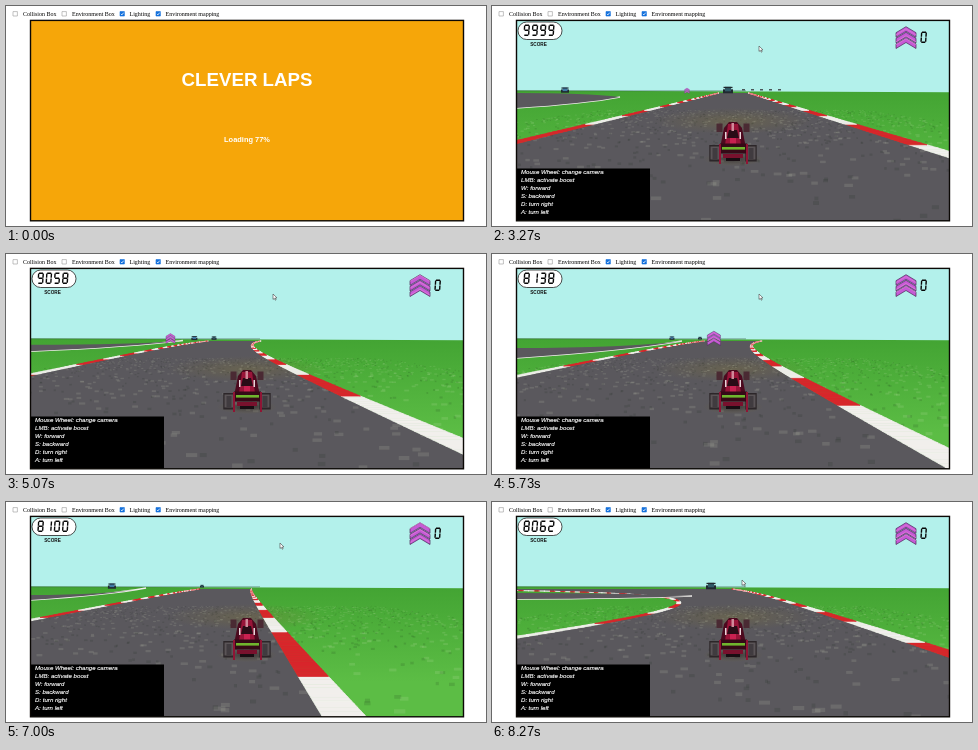
Write an HTML page with a canvas that moves like this. It is 480 px wide and 220 px high and loops after 8340 ms.

```html
<!DOCTYPE html>
<html lang="en">
<head>
<meta charset="utf-8">
<title>Racing game</title>
<style>
html, body { margin: 0; width: 100%; height: 100%; overflow: hidden; background: #fff; }
canvas, svg { position: absolute; left: 0; top: 0; width: 480px; height: 220px; }
.serif { font: 6px "Liberation Serif", serif; }
.sans { font: bold 7.45px "Liberation Sans", sans-serif; fill: #fff; text-anchor: middle; }
.help { font: italic 6.1px "Liberation Sans", sans-serif; fill: #fff; stroke: #fff; stroke-width: .15; }
</style>
</head>
<body>
<canvas id="view" width="480" height="220"></canvas>
<svg viewBox="0 0 480 220">
  <g class="serif">
    <text x="17" y="10">Collision Box</text>
    <text x="66" y="10">Environment Box</text>
    <text x="123.5" y="10">Lighting</text>
    <text x="159.5" y="10">Environment mapping</text>
  </g>
  <g stroke-width=".6">
    <path d="M7 5.6h4.4v4.4h-4.4zM56 5.6h4.4v4.4h-4.4z" fill="#fff" stroke="#999"/>
    <path d="M114 5.6h4.4v4.4h-4.4zM150 5.6h4.4v4.4h-4.4z" fill="#1471dc" stroke="#1471dc"/>
    <path d="M114.9 7.9l1 1 1.7-2.2M150.9 7.9l1 1 1.7-2.2" fill="none" stroke="#fff" stroke-width=".8"/>
  </g>
  <g id="load" class="sans">
    <rect x="24" y="14" width="434" height="201" fill="#f6a609"/>
    <text x="241" y="80" style="font-size:18.7px">CLEVER LAPS</text>
    <text id="percent" x="241" y="136.3"></text>
  </g>
  <g id="hud">
    <rect x="25" y="162.5" width="133" height="52"/>
    <g class="help">
      <text x="29" y="168.2">Mouse Wheel: change camera</text>
      <text x="29" y="176.2">LMB: activate boost</text>
      <text x="29" y="184.2">W: forward</text>
      <text x="29" y="192.2">S: backward</text>
      <text x="29" y="200.2">D: turn right</text>
      <text x="29" y="208.2">A: turn left</text>
    </g>
    <text x="46.5" y="39.8" class="sans" style="font-size:4.7px;fill:#111">SCORE</text>
  </g>
  <rect x="24.5" y="14.4" width="433" height="200.4" fill="none" stroke="#0b0805" stroke-width="1.4"/>
</svg>
<script>
const LOOP = 8340, RACE = 1500, CHASE = 3235, DRIVE = 3709, HORIZON = 85, FOCAL = 240;
const ROAD = '#5a585d', RED = '#d8262b', WHITE = '#f1efec';
const el = id => document.getElementById(id);
const g = el('view').getContext('2d');

// Road edges follow x = c + a*d + b/(d+3), with d the distance below the horizon.
// far: top, bottom and tip (depth, x) of the distant road; rivals: x and size of two cars.
const poses = [
  { at: DRIVE, right: [250, 3.1, 0], left: [235, -4, 0], far: [2, 17, 6, 128], rivals: [73, 8, 236, 10], boost: 195 },
  { at: 4470, right: [196, 2.46, 200], left: [176, -4.4, 130], far: [3, 6, 1, 165], rivals: [196, 7, 208, 6], boost: 112 },
  { at: 5730, right: [226, 1.76, 200], left: [202, -4.7, 100], far: [9, 19, 2, 190], rivals: [180, 5, 208, 4], boost: 222 },
  { at: 7000, right: [238, .6, 30], left: [192, -5, 60], far: [8, 13, 1, 140], rivals: [106, 8, 196, 4], boost: 60 },
  { at: 8270, right: [258, 2.85, -120], left: [434, -7.1, -2500], far: [6, 12, 9, 200], rivals: [0, 10, 219, 10], boost: 0 }];

const clamp = v => Math.min(1, Math.max(0, v));
const blend = (a, b, k) => Array.isArray(a) ? a.map((v, i) => blend(v, b[i], k)) : a + (b - a) * k;

function poseAt(t) {
  const i = Math.max(0, poses.slice(0, -1).findLastIndex(p => p.at <= t));
  const [a, b] = poses.slice(i, i + 2);
  let k = clamp((t - a.at) / (b.at - a.at));
  if (i === 0) k *= k;
  return Object.fromEntries(Object.keys(a).map(key => [key, blend(a[key], b[key], k)]));
}

// Points of a road edge from the bottom of the view up to the horizon
const edge = ([c, a, b]) => Array.from({ length: 141 }, (_, i) => {
  const d = 132 * Math.pow(2 / 132, i / 140);
  return [c + a * d + b / (d + 3), HORIZON + d];
});

function trace(points) {
  g.beginPath();
  points.forEach(p => g.lineTo(p[0], p[1]));
}
function poly(color, points) {
  trace(points);
  g.closePath();
  g.fillStyle = color;
  g.fill();
}
function box(color, x, y, w, h) {
  g.fillStyle = color;
  g.fillRect(x, y, w, h);
}
function line(color, width) {
  g.strokeStyle = color;
  g.lineWidth = width;
  g.stroke();
}
function glow(x, y, rx, ry, color) {
  g.save();
  g.translate(x, y);
  g.scale(rx, ry);
  const fade = g.createRadialGradient(0, 0, 0, 0, 0, 1);
  fade.addColorStop(0, color);
  fade.addColorStop(1, 'rgba(120,110,60,0)');
  box(fade, -1, -1, 2, 2);
  g.restore();
}

let seed = 7;
const rnd = () => (seed = seed * 16807 % 2147483647) / 2147483647;
const grains = Array.from({ length: 1600 }, () => [rnd(), rnd(), rnd()]);
const grain = c => c < .5 ? 'rgba(20,35,20,.13)' : 'rgba(225,235,200,.12)';

// Kerb whose stripes keep their length on the ground
function kerb(points, width, travel) {
  const ground = ([x, y]) => [(x - 240) / (y - HORIZON), FOCAL / (y - HORIZON)];
  let s = travel + ground(points[0])[1];
  for (let i = 1; i < points.length; i++) {
    const a = points[i - 1], b = points[i], p = ground(a), q = ground(b);
    const color = Math.floor(s / 2.6) % 2 ? RED : WHITE;
    s += Math.hypot(p[0] - q[0], p[1] - q[1]);
    poly(color, [a, b, [b[0] + width * (b[1] - HORIZON), b[1]], [a[0] + width * (a[1] - HORIZON), a[1]]]);
    line(color, .7);
  }
}

function chevrons(x, y, size, t) {
  const h = size / 2;
  const bend = top => [[x - h, top + size * .3], [x, top], [x + h, top + size * .3]];
  for (let i = 0; i < 3; i++) {
    const top = y + i * size * .28;
    poly('#c65ad6', [...bend(top), ...bend(top + size * .23).reverse()]);
    line('#4b2857', size / 28);
    trace(bend(top + (t / 500 + i / 3) % 1 * size * .2));
    line('#e27fd6', size / 28);
  }
}

// Seven-segment digits, one bit per bar
const SEGMENTS = [0x77, 0x24, 0x5d, 0x6d, 0x2e, 0x6b, 0x7b, 0x27, 0x7f, 0x6f];
const BARS = ['M.3 0h4', 'M0 .4v4.2', 'M4.6 .4v4.2', 'M.3 5h4', 'M0 5.4v4.2', 'M4.6 5.4v4.2', 'M.3 10h4'];
function digit(n, x, y) {
  g.save();
  g.transform(1, 0, -.07, 1, x + .7, y);
  g.strokeStyle = '#080808';
  g.lineWidth = 1.4;
  BARS.forEach((bar, i) => SEGMENTS[n] >> i & 1 && g.stroke(new Path2D(bar)));
  g.restore();
}

const score = t => 9999 - Math.floor(Math.max(0, t - DRIVE) * .0302)
  - (t > 4100 ? 900 : 0) - (t > 5100 ? 900 : 0);

function hud(t) {
  g.beginPath();
  g.roundRect(26, 16, 44, 17.5, 8.7);
  g.fillStyle = '#fff';
  g.fill();
  line('#222', .8);
  [...String(score(t))].forEach((n, i) => digit(+n, 32 + i * 8.2, 19.2));
  chevrons(414, 20.7, 20, t);
  digit(0, 429, 26.2);
}

function rival(x, size, color) {
  const y = HORIZON - .7;
  box('#20292f', x - size / 2, y - size * .1, size, size * .4);
  box(color, x - size * .3, y - size * .35, size * .6, size * .45);
  box('#20292f', x - size * .45, y - size * .35, size * .9, size * .13);
}

function racer() {
  glow(241, 153, 30, 7, 'rgba(15,12,18,.6)');
  for (const s of [-1, 1]) {
    const x = 241 + s * 18;
    box('#4a2a33', 241 + s * 13.5 - 3, 117.5, 6, 8.5);
    box('#2c2629', x - 5.7, 139, 11.4, 16.5);
    box('#5a5457', x - 4.5, 140.5, 9, 13);
    box('#403b3f', x - 2.5, 142, 5, 11);
  }
  poly('#4c0a1f', [[232, 122], [237, 116], [245, 116], [250, 122], [254, 142], [228, 142]]);
  poly('#981438', [[236, 118], [246, 118], [249, 139], [233, 139]]);
  poly('#2a0c16', [[237, 124], [245, 124], [247, 132], [235, 132]]);
  box('#d08a9a', 239.5, 117, 2.5, 8);
  box('#e8d6da', 233, 126, 1.5, 7);
  box('#e8d6da', 247.5, 126, 1.5, 7);
  box('#c82150', 238, 132, 6, 6);
  box('#350a17', 228, 137.5, 27, 10);
  box('#6fb52e', 230, 141, 23, 2.6);
  box('#8f1535', 227, 138, 2, 20);
  box('#8f1535', 254, 138, 2, 20);
  box('#78112d', 231, 148, 20, 4);
  box('#180e13', 234, 152, 14, 3);
}

function cursor(t) {
  const a = clamp((t - 5730) / 1270), b = clamp((t - 7000) / 1270);
  g.save();
  g.translate(267 + 7 * a - 24 * b, 40 + a + 37 * b);
  poly('#fff', [[0, 0], [0, 5.4], [1.3, 4.3], [2.3, 6.2], [3.1, 5.8], [2.3, 4], [4, 3.9]]);
  line('#444', .6);
  g.restore();
}

function farRoad([top, bottom, tip, x]) {
  const mid = (24 + 2 * x) / 3, y = HORIZON;
  g.beginPath();
  g.moveTo(24, y + bottom);
  g.quadraticCurveTo(mid, y + (bottom + tip) / 2 + 1, x, y + tip);
  line(WHITE, 1.4);
  g.quadraticCurveTo(mid, y + top, 24, y + top);
  g.fillStyle = ROAD;
  g.fill();
}

function chaseView(t) {
  const u = Math.max(0, t - DRIVE) / 1000, speed = 8.9;
  const travel = speed * (u < 1.5 ? u * u / 3 : u - .75) + 3.35;
  const pose = poseAt(t), r = edge(pose.right), l = edge(pose.left);
  const grass = g.createLinearGradient(0, HORIZON, 0, 180);
  grass.addColorStop(0, '#43a433');
  grass.addColorStop(1, '#5cbd45');
  box('#b3f1eb', 24, 14, 434, 75);
  poly(grass, [[24, 84.5], [458, 86.3], [458, 216], [24, 216]]);
  box('rgba(45,75,55,.5)', 24, 84.4, 230, .8);
  poly(ROAD, [...l, ...[...r].reverse(), [458, 217], [24, 217]]);
  glow(241, 115, 80, 13, 'rgba(126,116,62,.4)');
  for (const [a, b, c] of grains) {
    const z = 1.8 + (((b * 11 - travel) % 11) + 11) % 11, d = FOCAL / z;
    box(grain(c), 240 + (a - .5) * 14 * d, HORIZON + d, d * (.03 + c * .07), d * .035);
  }
  kerb(l, -.25, travel);
  farRoad(pose.far);
  kerb(r, .34, travel);

  if (t < 5000) for (let i = 0; i < 5; i++) box('#4a5658', 250 + i * 9 - u * 35, 83, 3, 1.5);
  const [ax, as, bx, bs] = pose.rivals;
  rival(ax, as, '#3f79a5');
  rival(bx, bs, '#315a68');
  if (t < 6500) {
    const size = 19110 / (7200 - t);
    chevrons(pose.boost, HORIZON - size * .6, size, t);
  }
  racer();
  cursor(t);
}

// Smooth curve through a few points
function curve(...pts) {
  const at = i => pts[Math.min(pts.length - 1, Math.max(0, i))], out = [];
  for (let k = 0; k <= (pts.length - 1) * 20; k++) {
    const i = Math.floor(k / 20), u = k / 20 - i;
    out.push([0, 1].map(c => {
      const [a, b, d, e] = [-1, 0, 1, 2].map(j => at(i + j)[c]);
      return b + u / 2 * (d - a + u * (2 * a - 5 * b + 4 * d - e + u * (3 * (b - d) + e - a)));
    }));
  }
  return out;
}

function border(points) {
  trace(points);
  line(WHITE, 4.8);
  g.setLineDash([8, 8]);
  line(RED, 4.8);
  g.setLineDash([]);
}

function smallCar(x, y, angle, color, size) {
  g.save();
  g.translate(x, y);
  g.rotate(angle);
  g.scale(size, size);
  for (const s of [-1, 1]) {
    box('#18181c', s * 3.5 - 1.2, -6, 2.4, 4);
    box('#18181c', s * 3.7 - 1.5, 4, 3, 5);
  }
  poly(color, [[-1, -9], [1, -9], [3, 2], [2, 8], [-2, 8], [-3, 2]]);
  box(color, -3.5, -9, 7, 1.6);
  box('#25131c', -1, -1, 2, 3);
  box(color, -3.5, 7.5, 7, 2);
  g.restore();
}

const track = [
  curve([210, 12], [198, 77], [188, 137], [183, 217]),
  curve([269, 12], [285, 102], [312, 177], [339, 202], [380, 211], [460, 206])];
const bendOuter = curve([121, 12], [125, 38], [111, 76], [79, 115], [22, 158]);
const bendInner = curve([22, 79], [37, 64], [42, 47], [22, 30]);

function topView(t) {
  const grass = '#60b44b';
  box(grass, 24, 14, 434, 202);
  poly(ROAD, [...track[0], [458, 217], ...[...track[1]].reverse()]);
  poly(ROAD, [[22, 12], ...bendOuter]);
  poly(grass, bendInner);
  glow(168, 103, 7, 9, 'rgba(205,230,150,.55)');
  glow(180, 75, 5, 8, 'rgba(205,230,150,.4)');
  for (const [x, y, c] of grains) box(grain(c), 24 + x * 434, 14 + y * 202, 1.5 + c * 3, 2.5);
  glow(240, 97, 50, 20, 'rgba(145,122,75,.45)');
  [...track, bendOuter, bendInner].forEach(border);
  g.save();
  g.translate(213, 156);
  g.rotate(.03);
  box('#f4f4f4', 0, 0, 53, 8);
  for (let i = 0; i < 54; i++) {
    const col = i % 18, row = Math.floor(i / 18);
    if ((col + row) % 2) box('#111', col * 2.95, row * 2.67, 2.95, 2.67);
  }
  g.restore();
  const s = (t - 1930) / 1000;
  smallCar(56 + s * 15, 71 - s * 40, -1.1 + clamp(s) * 1.4, '#2689b8', .6);
  smallCar(243.5, 41 - s * 45, 0, '#258d91', .45);
  smallCar(241, 117, 0, '#8d1741', .95);
}

const start = performance.now();
function draw(now) {
  const t = Math.max(0, now - start) % LOOP, racing = t >= RACE;
  el('load').style.display = racing ? 'none' : '';
  el('hud').style.display = racing ? '' : 'none';
  el('percent').textContent = `Loading ${Math.min(99, 77 + Math.floor(t / 66))}%`;
  g.clearRect(0, 0, 480, 220);
  if (racing) {
    g.save();
    g.beginPath();
    g.rect(24, 14, 434, 201);
    g.clip();
    (t < CHASE ? topView : chaseView)(t);
    hud(t);
    g.restore();
  }
  requestAnimationFrame(draw);
}
draw(start);
</script>
</body>
</html>
```
